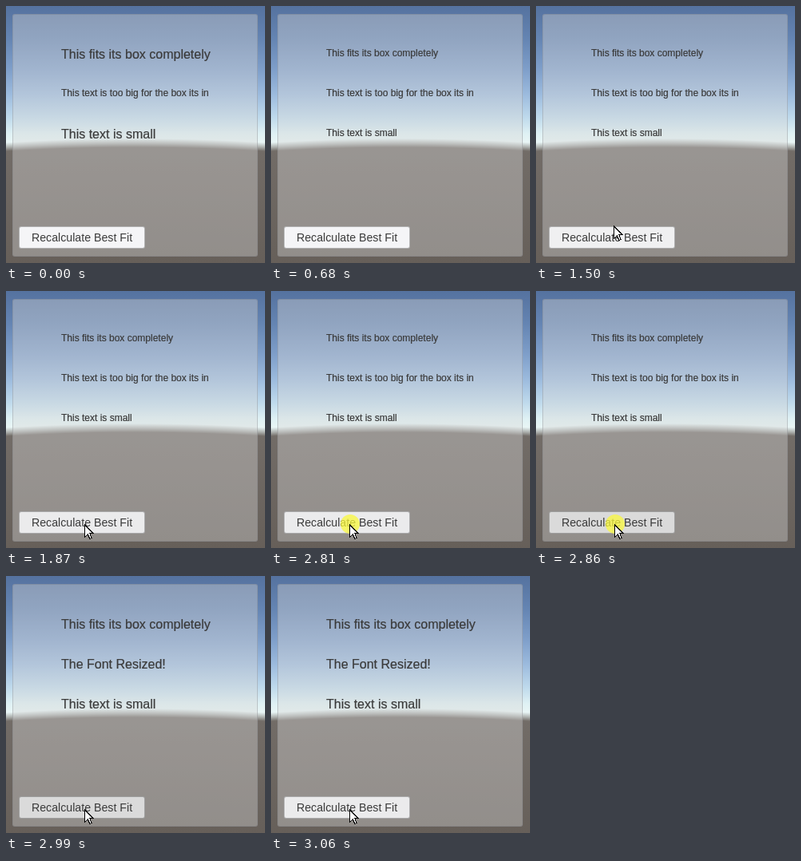
These frames come from a looping animation (324 px wide and 322 px high, 4.05 s). An HTML page:

```html
<!DOCTYPE html>
<html lang="en">
<head>
<meta charset="utf-8">
<title>Best fit text</title>
<style>
  html, body { margin: 0; width: 100%; height: 100%; overflow: hidden; }

  /* A flat sky behind a ground with a softly curved horizon. */
  .stage {
    position: relative;
    width: 324px;
    height: 322px;
    overflow: hidden;
    color: #3a3a3a;
    font-family: "Liberation Sans", Arial, sans-serif;
    white-space: nowrap;
    background:
      radial-gradient(circle at 162px 2800px,
        #665f59 2478px, #726c67 2623px,
        rgba(114, 108, 103, .5) 2628px, rgba(114, 108, 103, 0) 2634px),
      linear-gradient(
        #55729f 0, #6484b2 40px, #7f9fca 80px, #9bbadd 110px,
        #bfdaec 140px, #dff1f4 160px, #e8f5f5 170px);
  }
  .stage * { position: absolute; box-sizing: border-box; }

  .panel {
    left: 8px; top: 10px; width: 307px; height: 304px;
    border: 1px solid rgba(110, 112, 120, .3);
    border-radius: 3px;
    background: rgba(214, 214, 214, .392);
  }

  .line { left: 69px; font-size: 16px; line-height: 17px; }
  .small { font-size: 12px; line-height: 14px; }
  .line { -webkit-text-stroke: .2px #3a3a3a; }

  .button {
    left: 16px; top: 276px; width: 158px; height: 28px;
    border: 1px solid rgba(0, 0, 0, .28);
    border-radius: 3px;
    background: #f5f5f7;
  }
  .label {
    left: 16px; top: 282px; width: 158px;
    font-size: 14.2px; line-height: 16px; text-align: center;
  }
  .click {
    left: 87px; top: 280px; width: 24px; height: 24px;
    border-radius: 50%;
    background: rgba(250, 248, 60, .75);
  }
  .cursor { left: 0; top: 0; width: 12px; height: 19px; overflow: visible; }

  .fit, .before, .after, .button, .click, .cursor {
    animation: 4050ms step-end infinite;
  }
  .fit { animation-name: fit; }
  .before { animation-name: before; }
  .after { animation-name: after; }
  .button { animation-name: tint; }
  .click { animation-name: click; }
  .cursor { animation-name: move; }

  @keyframes fit {
    0%, 73.82% { font-size: 16px; line-height: 17px; }
    16.78% { font-size: 12px; line-height: 14px; }
  }
  @keyframes before {
    0% { visibility: visible; }
    73.82%, 100% { visibility: hidden; }
  }
  @keyframes after {
    0% { visibility: hidden; }
    73.82%, 100% { visibility: visible; }
  }
  @keyframes tint {
    0% { background-color: #f5f5f7; }
    32.34% { background-color: #f0f0f1; }
    46.17% { background-color: #ebebec; }
    70.61% { background-color: #dadada; }
    72.34% { background-color: #c5c5c5; }
    73.82% { background-color: #dadada; }
    75.55%, 100% { background-color: #ebebec; }
  }
  @keyframes click {
    0%, 72.34%, 100% { visibility: hidden; }
    69.38% { visibility: visible; }
  }
  @keyframes move {
    0% { transform: translate(37px, 330px); }
    29.13% { transform: translate(37px, 308px); }
    30.86% { transform: translate(62px, 294px); }
    32.34% { transform: translate(90px, 284px); }
    33.82% { transform: translate(112px, 278px); }
    35.3% { transform: translate(118px, 276px); }
    37.03% { transform: translate(97px, 275px); }
    39.99% { transform: translate(97px, 278px); }
    41.72% { transform: translate(97px, 281px); }
    43.45% { transform: translate(97px, 287px); }
    46.17%, 100% { transform: translate(98px, 292px); }
  }
</style>
</head>
<body>
<div class="stage">
  <div class="panel"></div>
  <div class="line fit" style="top: 52px">This fits its box completely</div>
  <div class="line small before" style="top: 102px">This text is too big for the box its in</div>
  <div class="line after" style="top: 102px">The Font Resized!</div>
  <div class="line fit" style="top: 152px">This text is small</div>
  <div class="button"></div>
  <div class="label">Recalculate Best Fit</div>
  <div class="click"></div>
  <svg class="cursor" viewBox="0 0 12 19" shape-rendering="crispEdges">
    <path d="M.5 .8V16.5L4.3 12.9L6.9 18.5L9.2 17.5L6.8 11.8H11.3Z" fill="#fff" stroke="#000"/>
  </svg>
</div>
</body>
</html>
```
